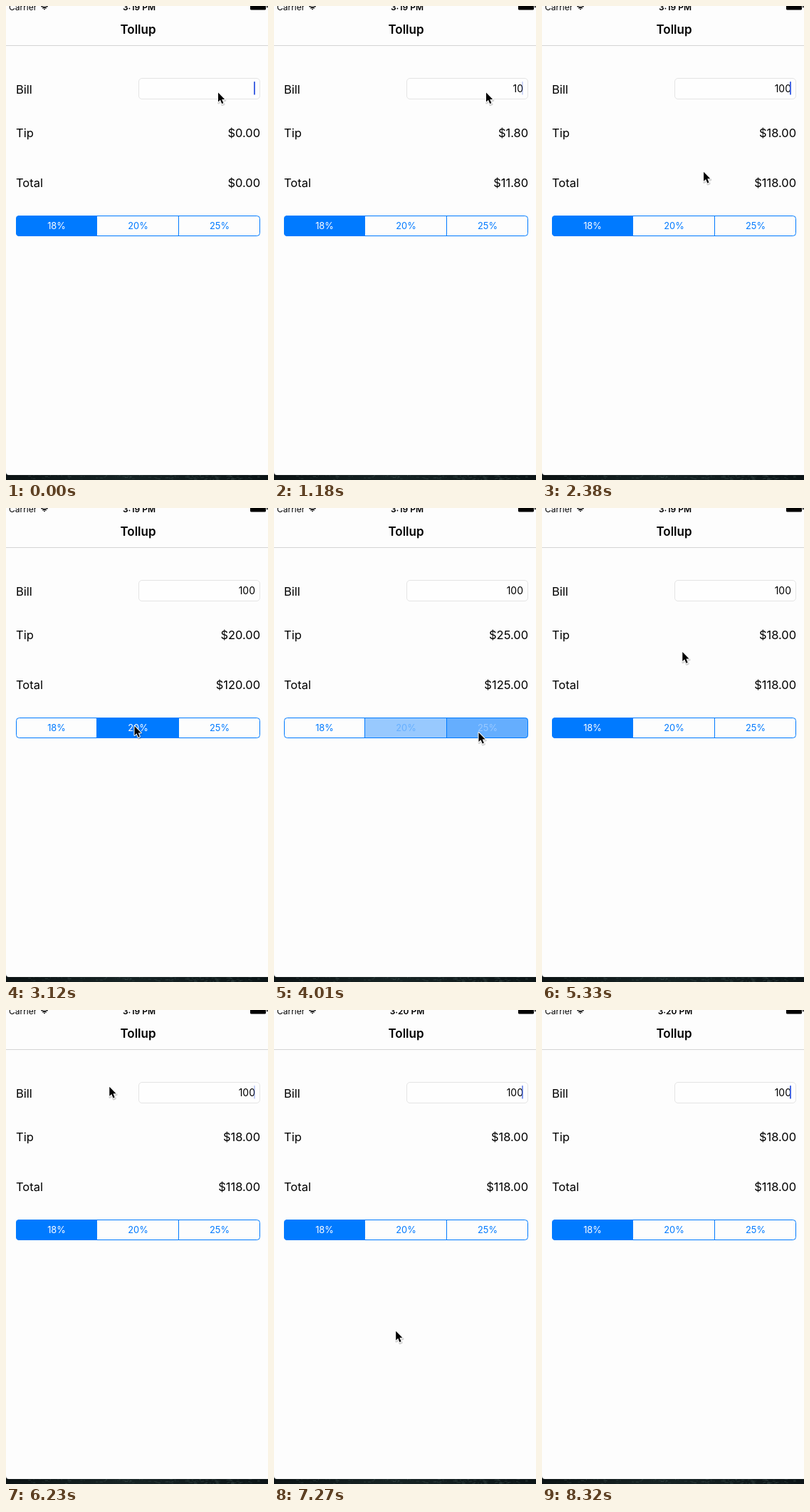
An HTML page that plays this animation: 368x665 px, repeating every 8.42 s.

```html
<!DOCTYPE html>
<html lang="en">
<head>
<meta charset="utf-8">
<title>Tip calculator</title>
<style>
  html, body { margin: 0; width: 100%; height: 100%; overflow: hidden; background: #fdfdfd; }
  svg { display: block; width: 368px; height: 665px; font-family: Inter, Roboto, sans-serif; }
  .row { font-size: 16.5px; }
  .end { text-anchor: end; }
  .mid { text-anchor: middle; }
</style>
</head>
<body>
<svg viewBox="0 0 368 665">
  <defs>
    <linearGradient id="desk">
      <stop offset="0" stop-color="#0c1314"/>
      <stop offset=".45" stop-color="#172425"/>
      <stop offset="1" stop-color="#0b1416"/>
    </linearGradient>
    <clipPath id="bar"><rect x="14" y="294" width="343" height="29" rx="4.5"/></clipPath>
    <path id="arrow" d="M0 0V13L3 10.2L5.2 15.6L7.4 14.7L5.2 9.4H9.2Z"/>
  </defs>
  <rect y="650" width="368" height="15" fill="url(#desk)"/>
  <g id="flecks" fill="#4a5f5d"></g>
  <path d="M0 0H368V658H4Q0 658 0 654Z" fill="#fdfdfd"/>

  <text x="4" y="5.5" font-size="12">Carrier</text>
  <g fill="none" stroke="#000" stroke-width="1.7">
    <path d="M49.6 1.2Q54 -2.8 58.4 1.2M51.4 3.1Q54 .8 56.6 3.1"/>
    <path d="M54 5.6L52.6 4.1Q54 3 55.4 4.1Z" fill="#000" stroke="none"/>
  </g>
  <text id="clock" class="mid" x="187" y="5.5" font-size="12" font-weight="600"></text>
  <rect x="343" y="-5" width="22" height="10.5" rx="1.5"/>
  <rect x="366" y="-1.5" width="1.5" height="4" rx=".7"/>
  <text class="mid" x="185.5" y="39" font-size="17" font-weight="600">Tollup</text>
  <rect y="55" width="368" height="1" fill="#d4d4d4"/>

  <g class="row">
    <text x="14" y="123">Bill</text>
    <text x="14" y="184">Tip</text>
    <text x="14" y="254">Total</text>
    <text id="tip" class="end" x="357.2" y="184"></text>
    <text id="total" class="end" x="357.2" y="254"></text>
  </g>

  <rect x="186.5" y="101.5" width="170" height="29" rx="4.5" fill="#fefefe" stroke="#e4e4e4"/>
  <text id="bill" class="end" x="350" y="121" font-size="14"></text>
  <rect id="caret" x="348" y="106" width="2" height="18.5" rx=".5" fill="#4566e2"/>

  <g id="segments" fill="#007aff" clip-path="url(#bar)"></g>
  <g fill="none" stroke="#007aff">
    <rect x="14.5" y="294.5" width="342" height="28" rx="4"/>
    <path d="M127.5 294V323M242.5 294V323"/>
  </g>
  <g id="labels" class="mid" font-size="12.8"></g>

  <g id="pointer" stroke-linejoin="round">
    <use href="#arrow" x=".6" y="1.6" stroke="#000" stroke-width="3" opacity=".16"/>
    <use href="#arrow" stroke="#fff" stroke-width="2" paint-order="stroke"/>
  </g>
</svg>
<script>
const LOOP = 8420, FIRST = 290, STEP = 148.7;
const RATES = [18, 20, 25];
const $ = id => document.getElementById(id);
const clamp = v => Math.min(1, Math.max(0, v));
const ease = u => u * u * (3 - 2 * u);

function add(parent, tag, attrs, text) {
  const el = document.createElementNS("http://www.w3.org/2000/svg", tag);
  for (const k in attrs) el.setAttribute(k, attrs[k]);
  if (text) el.textContent = text;
  return parent.appendChild(el);
}

const segments = RATES.map((rate, i) => ({
  fill: add($("segments"), "rect", { x: 13 + 114.5 * i, y: 294, width: 115, height: 29 }),
  label: add($("labels"), "text", { x: 71 + 114.5 * i, y: 313 }, rate + "%")
}));

let seed = 7;
const rand = () => (seed = seed * 16807 % 2147483647) / 2147483647;
for (let i = 0; i < 140; i++) {
  add($("flecks"), "rect", {
    x: 20 + rand() * 335, y: 658 + rand() * 6, width: 1 + rand() * 4, height: 1, opacity: rand() * .5
  });
}

// Pointer strokes: start, duration, end point
const HOME = [298, 121.5];
const strokes = [
  [1700, 1180, 180.5, 306],
  [3120, 740, 287.5, 315],
  [4160, 590, 102, 313],
  [5000, 640, 272, 115],
  [5640, 590, 145.5, 108],
  [6230, 150, 119, 89],
  [6530, 140, 58, 51],
  [6670, 300, 155, 425],
  [7120, 750, 295, 645]
];

function pointerAt(t) {
  return strokes.reduce(([x, y], [start, time, toX, toY]) => {
    const u = ease(clamp((t - start) / time));
    return [x + (toX - x) * u, y + (toY - y) * u];
  }, HOME);
}

// The caret blinks from the last key press or focus
const wakes = [-160, 730, 1330, 5788];
const BLINK = 1060;

function caretAt(t) {
  if (t > 2900 && t < 5780) return 0;
  const phase = (t - wakes.filter(w => w <= t + 5).pop()) % BLINK;
  return clamp((Math.abs(phase - 650) - 185) / 50);
}

// A press tints a segment, then the selection cross-fades to it
const taps = [[2820, 1], [3860, 2], [4890, 0]];

function selectionAt(t) {
  let rate = RATES[0], on = [1, 0, 0], tint = -1;
  for (const [press, to] of taps) {
    const step = Math.round((t - press) / STEP);
    if (step === 0) tint = to;
    if (step < 1) continue;
    const u = step === 1 ? .6 : 1;
    on = on.map((a, i) => a + ((i === to) - a) * u);
    rate = RATES[to];
  }
  return { rate, on, tint };
}

function draw(time) {
  const k = Math.floor((time - FIRST) / STEP + .13);
  const t = k < 0 ? 0 : FIRST + k * STEP;

  const { rate, on, tint } = selectionAt(t);
  segments.forEach(({ fill, label }, i) => {
    fill.setAttribute("opacity", i === tint ? .15 : on[i]);
    label.setAttribute("fill", `rgb(${255 * on[i] | 0},${122 + 133 * on[i] | 0},255)`);
  });

  const bill = t < 720 ? 0 : t < 1320 ? 10 : 100;
  $("bill").textContent = bill || "";
  $("tip").textContent = "$" + (bill * rate / 100).toFixed(2);
  $("total").textContent = "$" + (bill * (100 + rate) / 100).toFixed(2);
  $("clock").textContent = t < 7260 ? "3:19 PM" : "3:20 PM";
  $("caret").setAttribute("opacity", caretAt(t));

  const [x, y] = pointerAt(t);
  $("pointer").setAttribute("transform", `translate(${x.toFixed(1)} ${y.toFixed(1)})`);
  $("pointer").setAttribute("visibility", t > 8300 ? "hidden" : "visible");
}

function tick() {
  draw(performance.now() % LOOP);
  requestAnimationFrame(tick);
}
tick();
</script>
</body>
</html>
```
